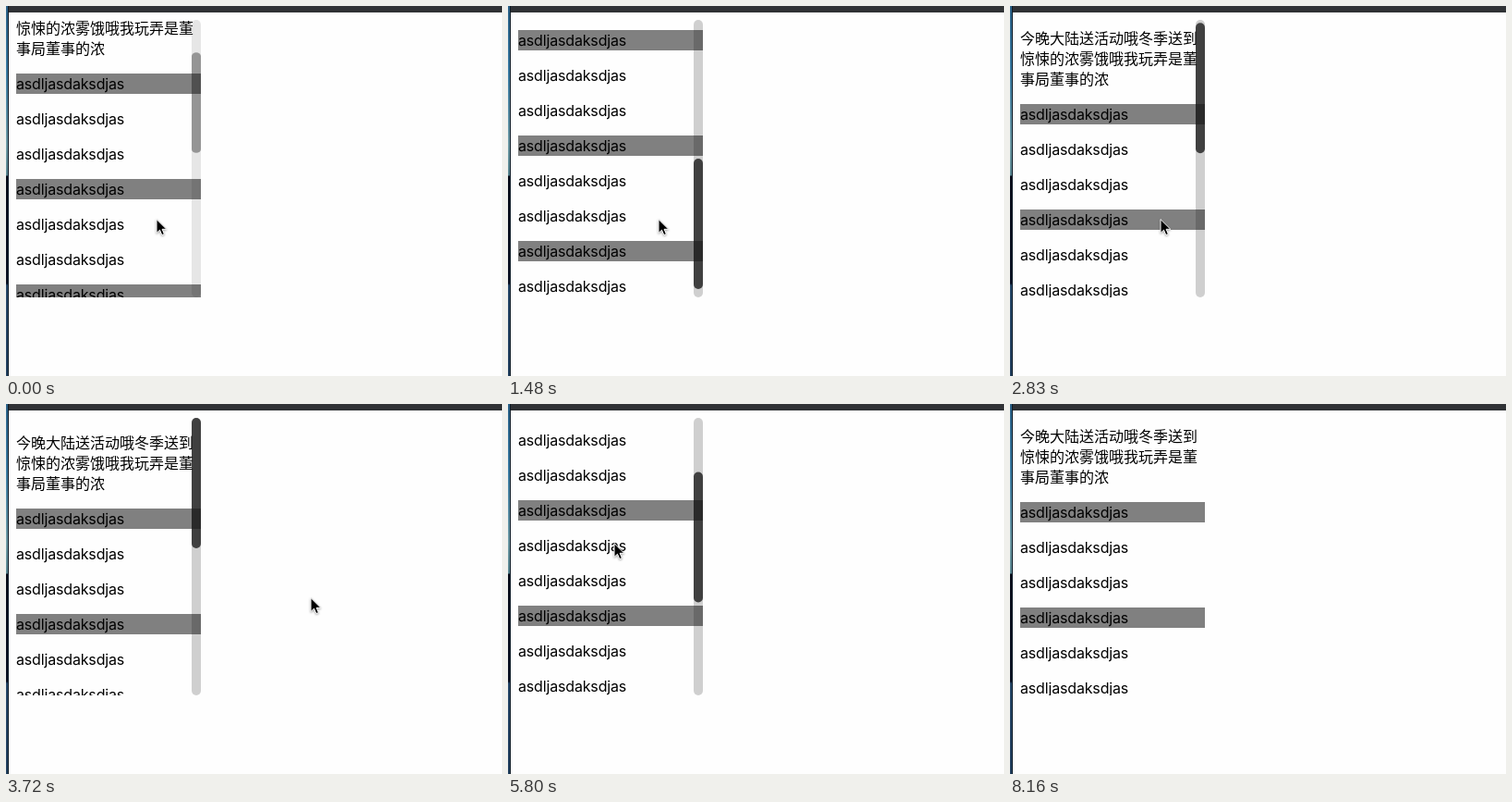
Write an HTML page that moves like this. It is 537 by 400 pixels and loops after 8.76 s.

```html
<!DOCTYPE html>
<html lang="zh-CN">
<head>
<meta charset="utf-8">
<title>Scroll panel</title>
<style>
  html, body { margin: 0; width: 100%; height: 100%; overflow: hidden; background: #fefefe; }
  #stage { position: relative; width: 537px; height: 400px; overflow: hidden; color: #000; }
  #desk {
    box-sizing: border-box; position: absolute; left: 0; top: 0; width: 3px; height: 400px;
    border-right: 1px solid #0c1a26;
    background: linear-gradient(#2c6288, #3a7ba3 70px, #6f9ba6 150px, #5b8792 183px,
      #070d1a 184px, #0a1224 300px, #27486a 302px, #22405f);
  }
  #top { position: absolute; left: 3px; top: 0; right: 0; height: 7px; background: #303235; }
  #panel { position: absolute; left: 11px; top: 15px; width: 200px; height: 300px; overflow: hidden; }
  #list { position: absolute; left: 0; top: 0; width: 200px; }
  p { margin: 16px 0; font: 16px/22px Inter, Roboto, sans-serif; letter-spacing: -0.01em; }
  .intro {
    position: relative; top: -1px; letter-spacing: 0;
    font-family: "Noto Sans CJK SC", "Noto Sans CJK", sans-serif; font-weight: 500;
  }
  .dark { background: #808080; }
  #track, #thumb { position: absolute; right: 0; top: 0; width: 10px; border-radius: 5px; }
  #track { height: 300px; background: #000; }
  #thumb { height: 141px; background: #1a1a1a; }
  #cursor { position: absolute; left: -1px; top: 0; overflow: visible; filter: drop-shadow(0 1px 1px rgba(0,0,0,.35)); }
</style>
</head>
<body>
<div id="stage">
  <div id="desk"></div>
  <div id="top"></div>
  <div id="panel">
    <div id="list"><p class="intro">今晚大陆送活动哦冬季送到惊悚的浓雾饿哦我玩弄是董事局董事的浓</p></div>
    <div id="track"></div>
    <div id="thumb"></div>
  </div>
  <svg id="cursor" width="13" height="19">
    <path d="M1 .6V15.4L4.5 12.2L6.8 17.6L9.4 16.5L7.1 11.3H11.8Z" fill="#000" stroke="#fff"/>
  </svg>
</div>
<script>
const LOOP = 8760, TICK = LOOP / 59;
const $ = id => document.getElementById(id);
const list = $('list'), track = $('track'), thumb = $('thumb'), cursor = $('cursor');

for (let i = 0; i < 14; i++) {
  const row = document.createElement('p');
  row.classList.toggle('dark', i % 3 === 0);
  row.textContent = 'asdljasdaksdjas';
  list.append(row);
}

// Moves in ticks; each continues from where the previous one ended.
const swipes = [
  { from: -1, to: 4, y: 110 }, { from: 4, to: 7, y: 280 },
  { from: 9, to: 11, y: 330 }, { from: 11, to: 16, y: 25 }, { from: 18, to: 20, y: 0 },
  { from: 34, to: 37, y: 100 }, { from: 38, to: 39, y: 123 }, { from: 39, to: 41, y: 7 }
];
const walks = [
  { from: 23, to: 25, x: 330, y: 209 }, { from: 26, to: 32, x: 115, y: 150 },
  { from: 45, to: 53, x: 449, y: 370 }, { from: 53, to: 55, x: 452, y: 402 }
];

const clamp = v => Math.max(0, Math.min(1, v));
const linear = u => u;
const glide = u => 1 - (1 - u) ** 1.75;

function follow(moves, k, axis, start, ease) {
  return Math.round(moves.reduce((pos, m) =>
    pos + (m[axis] - pos) * ease(clamp((k - m.from) / (m.to - m.from))), start));
}

// Half-visible on the first and last tick.
const visible = (k, first, last) => clamp(Math.min(k - first + 1, last - k + 1) / 2);

function draw(t) {
  const k = Math.floor((t + 10) / TICK) % 59;
  const y = follow(swipes, k, 'y', 7, glide);
  const shown = visible(k, 0, 29) + visible(k, 35, 49);
  const grow = .54 + .46 * shown;
  list.style.transform = `translateY(${-y}px)`;
  track.style.opacity = .185 * shown;
  thumb.style.opacity = .79 * shown;
  thumb.style.transform = `translateY(${y / 2.1}px) scaleY(${grow})`;
  cursor.style.transform =
    `translate(${follow(walks, k, 'x', 163, linear)}px, ${follow(walks, k, 'y', 230, linear)}px)`;
}

const start = performance.now();
function tick() {
  draw((performance.now() - start) % LOOP);
  requestAnimationFrame(tick);
}
tick();
</script>
</body>
</html>
```
